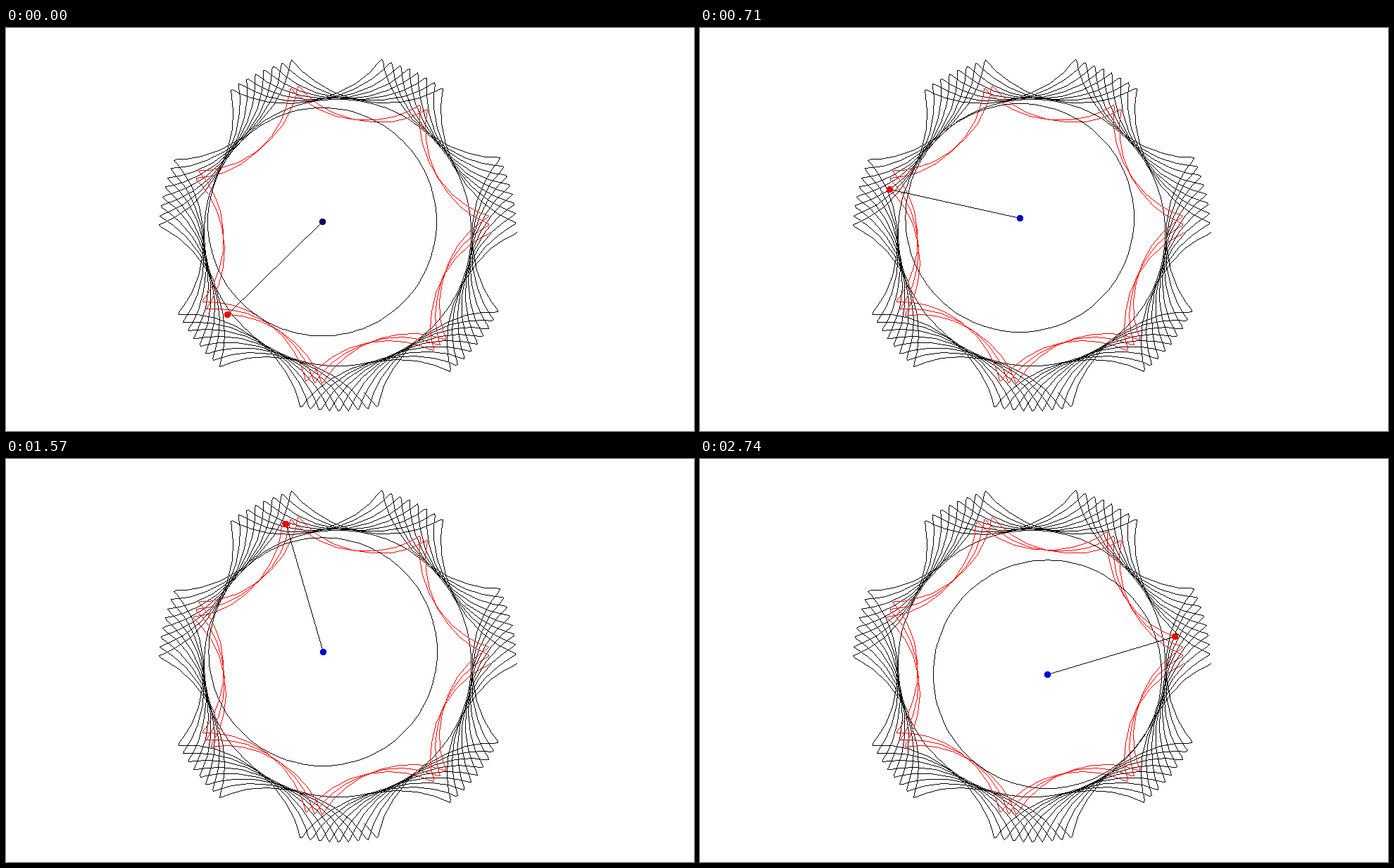
A matplotlib script for the animation above (2.77 s loop, 977 by 573 pixels).

```python
import numpy as np
import matplotlib.pyplot as plt
from matplotlib.animation import FuncAnimation

W, H, DPI = 977, 573, 64
CENTRE = 470.7 + 290.5j            # centre of the ring, y pointing down
RING, WHEEL, DOT = 189.7, 162.3, 4.5
ARM, ROD = 27, 189                 # wheel centre offset, pen length
SCALE = 1.176                      # finished curve relative to the red one
STEP, RATIO = 0.5, 0.165           # wheel turn per step, pen turn per wheel turn
START = 181                        # steps already drawn when the loop begins
TICK, LOOP = 10, 2770
BLACK, RED = (0, 0, 0), (255, 0, 0)

# The steps run at a nearly even pace between these moments (ms)
KEY_TIMES = [0, 470, 710, 1210, 1920, 2360, 2740, LOOP]
KEY_STEPS = [0, 8, 12, 20, 31, 38, 44, 44.9]

rows, cols = np.ogrid[:H, :W]


def hub(t):
    return ARM * np.exp(1j * t)


def pen(t):
    return hub(t) + ROD * np.exp(-1j * RATIO * t)


def to_stage(z):
    return CENTRE + np.conj(z)


def stroke(img, z, color):
    """Draw a polyline one pixel wide, without smoothing."""
    p = to_stage(np.asarray(z))
    x, y = np.rint(p.real), np.rint(p.imag)
    for x0, y0, x1, y1 in zip(x, y, x[1:], y[1:]):
        count = int(max(abs(x1 - x0), abs(y1 - y0))) + 1
        across = np.rint(np.linspace(x0, x1, count)).astype(int)
        down = np.rint(np.linspace(y0, y1, count)).astype(int)
        img[down, across] = color


def circle(img, z, radius, color):
    stroke(img, z + radius * np.exp(1j * np.linspace(0, 2 * np.pi, 121)), color)


def dot(img, z, color):
    p = to_stage(z)
    inside = np.hypot(cols - np.rint(p.real), rows - np.rint(p.imag)) < DOT
    img[inside] = color


backdrop = np.full((H, W, 3), 255, np.uint8)
stroke(backdrop, SCALE * pen(np.arange(0, 100 * np.pi, STEP)), BLACK)
circle(backdrop, 0, RING, BLACK)


def picture(n):
    img = backdrop.copy()
    t = (START + n) * STEP
    a, b = hub(t), pen(t)
    stroke(img, pen(np.arange(START + n + 1) * STEP), RED)
    circle(img, a, WHEEL, BLACK)
    stroke(img, [a, b], BLACK)
    dot(img, a, (0, 0, int(230 - 134 * np.exp(-n / 8))))
    dot(img, b, (245, 0, 0))
    return img


fig = plt.figure(figsize=(W / DPI, H / DPI), dpi=DPI, facecolor="white")
view = fig.figimage(picture(0), origin="upper")


def draw(i):
    n = int(np.interp(i * TICK, KEY_TIMES, KEY_STEPS) + 1e-6)
    view.set_data(picture(n))
    return (view,)


anim = FuncAnimation(fig, draw, frames=LOOP // TICK, interval=TICK, repeat=True)
plt.show()
```
